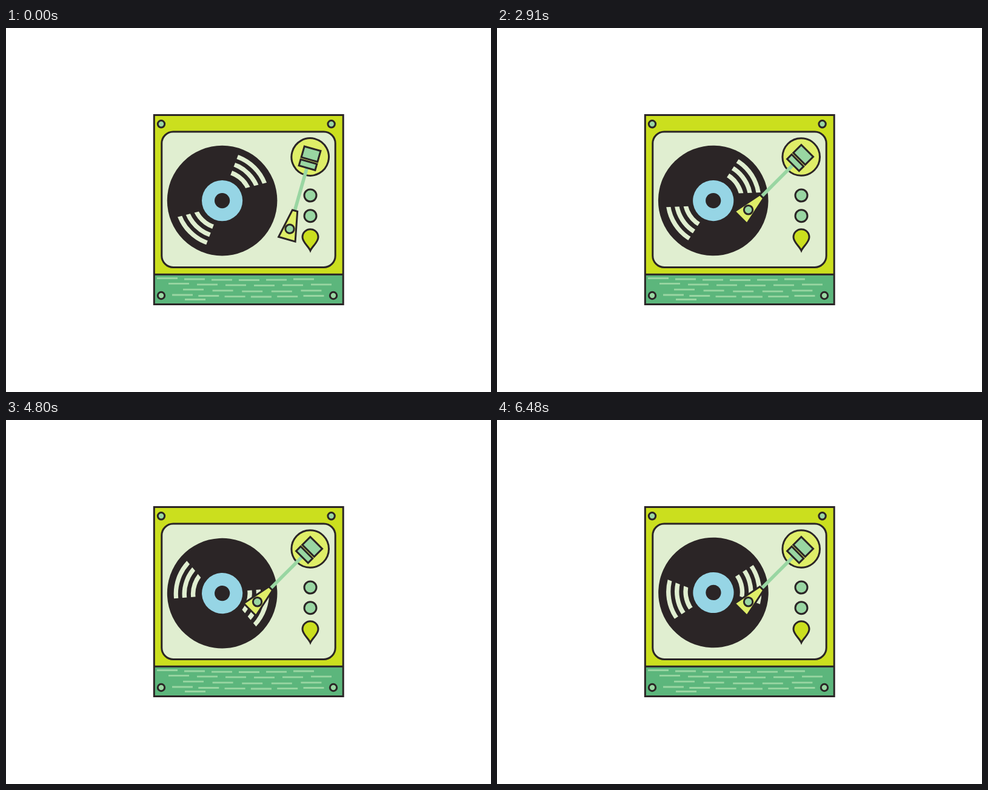
Recreate the animation shown at these times as an HTML page. Size 800 by 600 pixels, loop 7.8 s.

```html
<!DOCTYPE html>
<html lang="en">
<head>
<meta charset="utf-8">
<title>Record player</title>
<style>
  html, body { margin: 0; width: 100%; height: 100%; overflow: hidden; background: #fff; }
  svg { display: block; width: 100%; height: 100%; }
  .ink { stroke: #2b2526; stroke-width: 3; }
  .lime { fill: #cbdf1e; }
  .lemon { fill: #dfee68; }
  .mint { fill: #99d6a2; }
  .mintLine { stroke: #99d6a2; fill: none; }
</style>
</head>
<body>
<svg viewBox="0 0 800 600">
  <defs>
    <clipPath id="wedge"><path d="M10 -31 L34 -94 H90 L107 -37 L26 -16Z"/></clipPath>
    <g id="grooves" clip-path="url(#wedge)" fill="none" stroke="#e0eed0" stroke-width="7.4">
      <circle r="75"/><circle r="61"/><circle r="46.7"/>
    </g>
  </defs>

  <!-- case -->
  <rect class="lime" x="244.3" y="143.5" width="311.9" height="263"/>
  <rect fill="#5cb67c" x="244.3" y="406.3" width="311.9" height="49.2"/>
  <path class="mintLine" id="grain" stroke-width="2.8"/>
  <path class="ink" fill="none" d="M244.3 143.5h311.9v312h-311.9zM244.3 406.3h311.9"/>
  <rect class="ink" fill="#e0eed0" x="256.8" y="171" width="286.4" height="223.4" rx="19"/>
  <g class="ink mint">
    <circle cx="256" cy="158.3" r="5.7"/><circle cx="536.6" cy="158.3" r="5.7"/>
    <circle cx="256" cy="441" r="5.7"/><circle cx="540" cy="441" r="5.7"/>
    <circle cx="502" cy="276" r="10"/><circle cx="502" cy="309.7" r="10"/>
  </g>
  <path class="ink lime" d="M502 367C499 360 489 353 489 344.7a13 13 0 0 1 26 0C515 353 505 360 502 367Z"/>

  <g id="record">
    <g transform="translate(356.6 284.6)">
      <circle r="90.8" fill="#2b2526"/>
      <g transform="translate(0 -1.4)">
        <use href="#grooves"/><use href="#grooves" transform="rotate(180)"/>
      </g>
      <circle r="33.6" fill="#96d5e5"/>
      <circle r="12.6" fill="#2b2526"/>
    </g>
  </g>

  <!-- tone arm, drawn hanging straight down from its pivot -->
  <g id="arm">
    <circle class="ink lemon" r="30.8"/>
    <path class="mintLine" stroke-width="5.6" d="M-.2 19V92"/>
    <rect class="ink mint" x="-13.9" y="-14.2" width="27.8" height="18.6"/>
    <rect class="ink mint" x="-13.9" y="8.2" width="27.8" height="10.6"/>
    <path class="ink lemon" d="M-4.2 92.2H4.4L14.6 141H-14Z"/>
    <circle class="ink mint" cx=".1" cy="123.3" r="7.2"/>
  </g>
</svg>
<script>
  const LOOP = 7800, STEP = 30;
  const byId = id => document.getElementById(id);

  // One slightly bowed row of equally long wood grain strokes.
  function grainRow(x, y, gap, count) {
    return Array.from({ length: count }, (_, i) =>
      `M${x + gap * i} ${y + 3 * Math.sin(Math.PI * i / count)}h34`).join('');
  }

  byId('grain').setAttribute('d',
    grainRow(249, 412.5, 45, 6) +
    grainRow(268, 421.3, 47, 6) +
    grainRow(292, 431.2, 48.6, 5) +
    grainRow(274, 440, 43.3, 6) +
    grainRow(295, 447.5, 0, 1));

  function ease(time, start, end) {
    const s = Math.min(1, Math.max(0, (time - start) / (end - start)));
    return s * s * (3 - 2 * s);
  }

  function draw(now) {
    const time = Math.floor(now % LOOP / STEP) * STEP;
    const armAngle = 15.9 + 29.1 * ease(time, 0, 1870);
    const recordAngle = 396 * ease(time, 2490, 6480);
    byId('arm').setAttribute('transform', `translate(501.7 212.5) rotate(${armAngle})`);
    byId('record').setAttribute('transform', `rotate(${recordAngle} 356.95 285.1)`);
  }

  const began = performance.now();
  function tick() {
    draw(performance.now() - began);
    requestAnimationFrame(tick);
  }
  tick();
</script>
</body>
</html>
```
